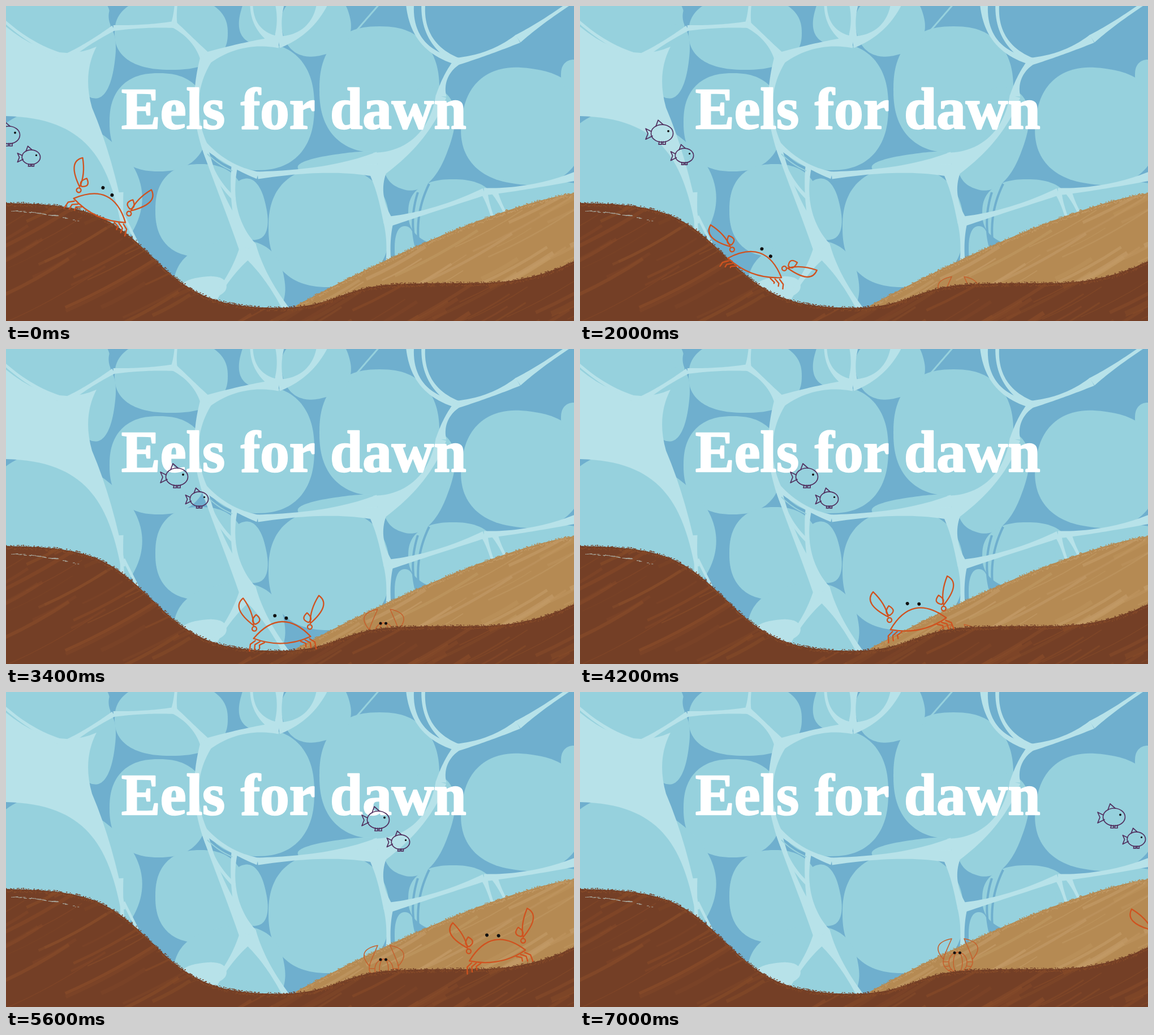
An HTML page with a canvas that plays this animation: 1004 px wide and 558 px high, repeating every 7200 ms.

```html
<!DOCTYPE html>
<html lang="en">
<head>
<meta charset="utf-8">
<title>Eels for dawn</title>
<style>
  html, body { margin: 0; width: 100%; height: 100%; overflow: hidden; background: #6fafce; }
  canvas { display: block; width: 1004px; height: 558px; }
</style>
</head>
<body>
<canvas id="stage" width="1004" height="558"></canvas>
<script>
const W = 1004, H = 558, LOOP = 7200, STEP = 200, RAD = Math.PI / 180;
const MID = '#6fafce', LIGHT = '#96d1dd', FOAM = '#b7e2e9';
const BROWN = '#743f26', RUST = '#874b29', TAN = '#b58a53', SAND = '#c29a66';
const CRAB = '#d0521f', SHY = '#c4622f', FISH = '#51305f', INK = '#111';
const ctx = document.getElementById('stage').getContext('2d');

let seed = 7;
const rnd = () => (seed = (seed * 16807) % 2147483647) / 2147483647;
const between = (a, b) => a + (b - a) * rnd();

function layer(paint) {
  const cv = document.createElement('canvas');
  cv.width = W;
  cv.height = H;
  paint(cv.getContext('2d'));
  return cv;
}

// ---- Water: rounded cells, joined by a net of foam ----

// Superellipse, tilted by deg
function cell(c, color, x, y, rx, ry, deg = 0) {
  const soft = v => Math.sign(v) * Math.abs(v) ** .84;
  c.save();
  c.translate(x, y);
  c.rotate(deg * RAD);
  c.fillStyle = color;
  c.beginPath();
  for (let a = 0; a < 360; a += 3) c.lineTo(rx * soft(Math.cos(a * RAD)), ry * soft(Math.sin(a * RAD)));
  c.fill();
  c.restore();
}

// Bowed ribbon between two [x, y, size] knots: flares at the knots, thin between
function vein(c, color, a, b, bow = 0, thin = 5) {
  const dx = b[0] - a[0], dy = b[1] - a[1], left = [], right = [];
  for (let i = 0; i <= 24; i++) {
    const t = i / 24, s = 4 * bow * t * (1 - t), ds = 4 * bow * (1 - 2 * t);
    const x = a[0] + dx * t - dy * s, y = a[1] + dy * t + dx * s;
    const tx = dx - dy * ds, ty = dy + dx * ds;
    const k = (a[2] * (1 - t) ** 3 + b[2] * t ** 3 + thin) / 2 / Math.hypot(tx, ty);
    left.push([x - ty * k, y + tx * k]);
    right.unshift([x + ty * k, y - tx * k]);
  }
  c.fillStyle = color;
  c.beginPath();
  left.concat(right).forEach(p => c.lineTo(...p));
  c.fill();
}

const CELLS = [
  [70, 28, 115, 72], [164, 98, 28, 66, 8], [292, 48, 100, 65],
  [270, 206, 87, 87], [442, 178, 103, 113], [450, 18, 36, 50, 15], [548, 32, 61, 56, -15],
  [660, 148, 106, 112], [730, 235, 55, 94, 20], [915, 213, 110, 103, 8], [1005, 122, 24, 27],
  [571, 392, 107, 106], [590, 276, 75, 14, -8], [344, 362, 80, 82], [432, 360, 28, 55, -12],
  [90, 330, 150, 130, 35], [395, 498, 98, 82, -10],
  [790, 366, 79, 59], [940, 355, 100, 40, -8], [705, 430, 18, 40]
];
const KNOTS = {
  A: [-8, 22, 0], B: [105, 92, 8], C: [190, 39, 5], D: [297, 33, 7], E: [354, 93, 17], F: [482, 64, 16],
  G: [350, 245, 6], H: [445, 300, 8], I: [657, 281, 40], J: [769, 160, 14], K: [798, 98, 8],
  L: [905, 58, 11], M: [1010, -14, 2], N: [714, -8, 10], O: [738, -8, 2], P: [484, -8, 14],
  Q: [560, -8, 16], R: [434, -8, 0], S: [428, 430, 27], T: [404, 284, 6], U: [404, 342, 2],
  V: [361, 530, 6], W: [500, 545, 8], X: [676, 382, 13], Y: [676, 462, 6], Z: [845, 329, 8],
  a: [1012, 300, 12], b: [860, 374, 0], c: [863, 328, 8], d: [884, 370, 0],
  e: [203, 330, 4], f: [206, 412, 4], g: [208, 372, 0], h: [232, 420, 0]
};
const LINKS = `AB.05 BC0 CD0 OK.17 DE-.05 EF-.06 EG.1 GH.06 HI0 IJ.13 JK-.1 KL.04 LM0 NK.2
  PF0 QF-.15 RF.18 GS.03 TS.08 GU.08 SV0 SW0 IX.05 XY0 XZ.02 Za.03 Zb0 cd0 ef0 gh0`.split(/\s+/);

const water = layer(c => {
  c.fillStyle = MID;
  c.fillRect(0, 0, W, H);
  CELLS.forEach(p => cell(c, LIGHT, ...p));
  vein(c, MID, [194, -8, 0], [192, 42, 0], .18);
  vein(c, MID, [748, 315, 0], [729, 415, 0], .07, 4);
  vein(c, MID, [728, 330, 0], [724, 424, 0], .07, 4);
  vein(c, LIGHT, [664, -8, 0], [600, 66, 0], 0, 3);

  // pale shallows on the left
  c.fillStyle = FOAM;
  c.beginPath();
  c.moveTo(-10, 28);
  c.quadraticCurveTo(80, 108, 160, 72);
  c.quadraticCurveTo(135, 120, 152, 180);
  c.quadraticCurveTo(190, 270, 211, 385);
  c.lineTo(203, 385);
  c.bezierCurveTo(180, 270, 140, 195, -10, 195);
  c.fill();
  cell(c, FOAM, 348, 500, 42, 20, -8);

  vein(c, FOAM, [301, -8, 0], KNOTS.D);
  LINKS.forEach(l => vein(c, FOAM, KNOTS[l[0]], KNOTS[l[1]], +l.slice(2)));
  vein(c, LIGHT, [356, 262, 0], [400, 292, 0], .05, 2);
});

// ---- Sea bed ----

const slope = (x, mid, k) => 1 / (1 + Math.exp((mid - x) / k));
const duneY = x => 331 + 200 * Math.max(0, (1012 - x) / 500) ** 1.34;
const bedY = x => 348 + 190 * slope(x, 257, 49) - 47 * slope(x, 590, 32) -
  42 * Math.max(0, (x - 830) / 180) ** 2.2;

function ground(c, top, from, color, stripe, count) {
  c.save();
  c.beginPath();
  c.moveTo(from, H);
  for (let x = from; x <= W; x += 4) c.lineTo(x, top(x));
  c.lineTo(W, H);
  c.fillStyle = color;
  c.fill();
  c.clip();
  c.strokeStyle = stripe;
  for (let i = 0; i < count; i++) {
    const x = between(from - 80, W), y = top(Math.max(x, from)) + between(0, 210), len = between(60, 190);
    c.globalAlpha = between(.25, .8);
    c.lineWidth = between(1, 8);
    c.beginPath();
    c.moveTo(x, y);
    c.quadraticCurveTo(x + len * .5, y - len * .22, x + len, y - len * .55);
    c.stroke();
  }
  c.restore();
  // crumbly edge
  for (let x = from; x < W; x += .8) {
    const d = between(-3, 5);
    c.fillStyle = d > 1 ? stripe : color;
    c.fillRect(x, top(x) + d, between(1, 2.5), between(1, 2));
  }
}
const dune = layer(c => ground(c, duneY, 512, TAN, SAND, 60));
const bed = layer(c => {
  ground(c, bedY, 0, BROWN, RUST, 90);
  c.fillStyle = '#a9aaa0';
  for (let i = 0; i < 40; i++) {
    const x = between(8, 130);
    c.fillRect(x, 362 + x * x / 900 + between(0, 2), between(1, 6), 1);
  }
  c.font = 'bold 103px "Liberation Serif", "Times New Roman", serif';
  c.fillStyle = c.strokeStyle = '#fff';
  c.lineWidth = 2.5;
  c.lineJoin = 'round';
  [['Eels', 204], ['for', 415], ['dawn', 573]].forEach(([word, x]) => {
    c.fillText(word, x, 217);
    c.strokeText(word, x, 217);
  });
});

// ---- Animals ----

// Smooth path through keyframes [step, value...]
function track(keys, n) {
  let i = 0;
  while (i < keys.length - 2 && n >= keys[i + 1][0]) i++;
  const a = keys[i], b = keys[i + 1], p = keys[i - 1] || a, q = keys[i + 2] || b;
  const span = b[0] - a[0], t = (n - a[0]) / span, t2 = t * t, t3 = t2 * t;
  return a.slice(1).map((v, j) => {
    const w = b[j + 1];
    const m0 = (w - p[j + 1]) / (b[0] - p[0]) * span, m1 = (q[j + 1] - v) / (q[0] - a[0]) * span;
    return (2 * t3 - 3 * t2 + 1) * v + (t3 - 2 * t2 + t) * m0 + (3 * t2 - 2 * t3) * w + (t3 - t2) * m1;
  });
}
// step: x, y
const SWIM = [[0, 25, 227], [6, 94, 223.5], [13, 226, 225], [17, 322, 225], [21, 421, 225], [28, 678, 225], [35, 964, 220]];
// step: x, y, tilt
const WALK = [[0, 173, 347, 25], [6, 256, 390, 33], [13, 369, 488, 8], [17, 488, 494, -2], [21, 595, 470, -12], [28, 866, 450, -11], [35, 1059, 406, -25]];
// step: depth below the full height
const PEEK = [[0, 62], [8, 62], [13, 9], [17, 24], [21, 51], [23, 60], [28, 12], [35, 0]];

function pose(x, y, deg, sx, sy, paint) {
  ctx.save();
  ctx.translate(x, y);
  ctx.rotate(deg * RAD);
  ctx.scale(sx, sy);
  paint();
  ctx.restore();
}
const bothSides = paint => [-1, 1].forEach(s => pose(0, 0, 0, s, 1, () => paint(s)));
function dot(x, y, r) {
  ctx.fillStyle = INK;
  ctx.beginPath();
  ctx.arc(x, y, r, 0, 7);
  ctx.fill();
}
function oval(x, y, rx, ry = rx, from = 0, to = 360) {
  ctx.beginPath();
  ctx.ellipse(x, y, rx, ry, 0, from * RAD, to * RAD);
  ctx.stroke();
}
function line(...p) {
  ctx.beginPath();
  for (let i = 0; i < p.length; i += 2) ctx.lineTo(p[i], p[i + 1]);
  ctx.stroke();
}
// Two curves from a to b, pulled towards c and d
function lens(a, b, c, d) {
  ctx.beginPath();
  ctx.moveTo(...a);
  ctx.quadraticCurveTo(...c, ...b);
  ctx.quadraticCurveTo(...d, ...a);
  ctx.stroke();
}
function pen(color, width) {
  ctx.strokeStyle = color;
  ctx.lineWidth = width;
  ctx.lineCap = ctx.lineJoin = 'round';
}

function fish(x, y, size) {
  pose(x, y, 0, size, size, () => {
    pen(FISH, 1.7 / size);
    oval(-20, 1.5, 19.5, 15.5);
    line(-39, -2, -49, -7, -45, 2, -49, 12, -37, 6);
    line(-31, -11, -27, -22, -18, -14);
    [-25, -18].forEach(f => line(f, 16, f - 1, 21, f + 4, 21, f + 4, 16));
    dot(-9, -2.5, 1.9);
  });
}

function bigCrab(n) {
  const [x, y, deg] = track(WALK, n);
  const droop = Math.max(0, Math.min(1, (n - 8) / 4, (16 - n) / 3));
  pose(x, y, deg, 1, 1, () => {
    pen(CRAB, 2.3);
    lens([-51, 17], [50, 17], [0, -39], [0, 38]);
    bothSides(s => {
      pose(49, 0, droop * (s < 0 ? 86 : 110), 1, 1, () => {
        oval(0, 0, 4);
        lens([1, -6], [18, -55], [40, -38], [1, -30]);
        lens([-2, -8], [-4, -25], [8, -14], [-17, -14]);
      });
      for (let i = 0; i < 3; i++) {
        line(48 - i * 8, 21 + i * 2, 57 - i * 8, 27 + i, 59 - i * 9, 39 - i * 2 - droop * 8);
      }
    });
    dot(-12 + 24 * droop, -22 + 6 * droop, 3);
    dot(8 + 22 * droop, -17 + 10 * droop, 3);
  });
}

function smallCrab(n) {
  pose(668, 462 + track(PEEK, n)[0], 0, 1, 1, () => {
    pen(SHY, 1.6);
    bothSides(() => {
      lens([26, 11], [11, -25], [50, -17], [21, -3]);
      oval(0, 16, 26, 20, -20, 70);
      for (let a = 0; a < 70; a += 25) {
        const u = Math.cos(a * RAD), v = Math.sin(a * RAD);
        line(17 * u, 16 + 17 * v, 26 * u, 16 + 20 * v);
      }
    });
    oval(0, 17, 16, 18);
    oval(0, 17, 8, 18);
    dot(-6, 0, 2.5);
    dot(3.5, 0, 2.5);
  });
}

function draw(time) {
  const n = Math.floor((time % LOOP) / STEP);
  ctx.drawImage(water, 0, 0);
  ctx.drawImage(dune, 0, 0);
  smallCrab(n);
  ctx.drawImage(bed, 0, 0);
  const [x, y] = track(SWIM, n);
  fish(x, y, 1);
  fish(x + 36, y + 39.5, .83);
  bigCrab(n);
}
const start = performance.now();
function tick() {
  draw(performance.now() - start);
  requestAnimationFrame(tick);
}
tick();
</script>
</body>
</html>
```
